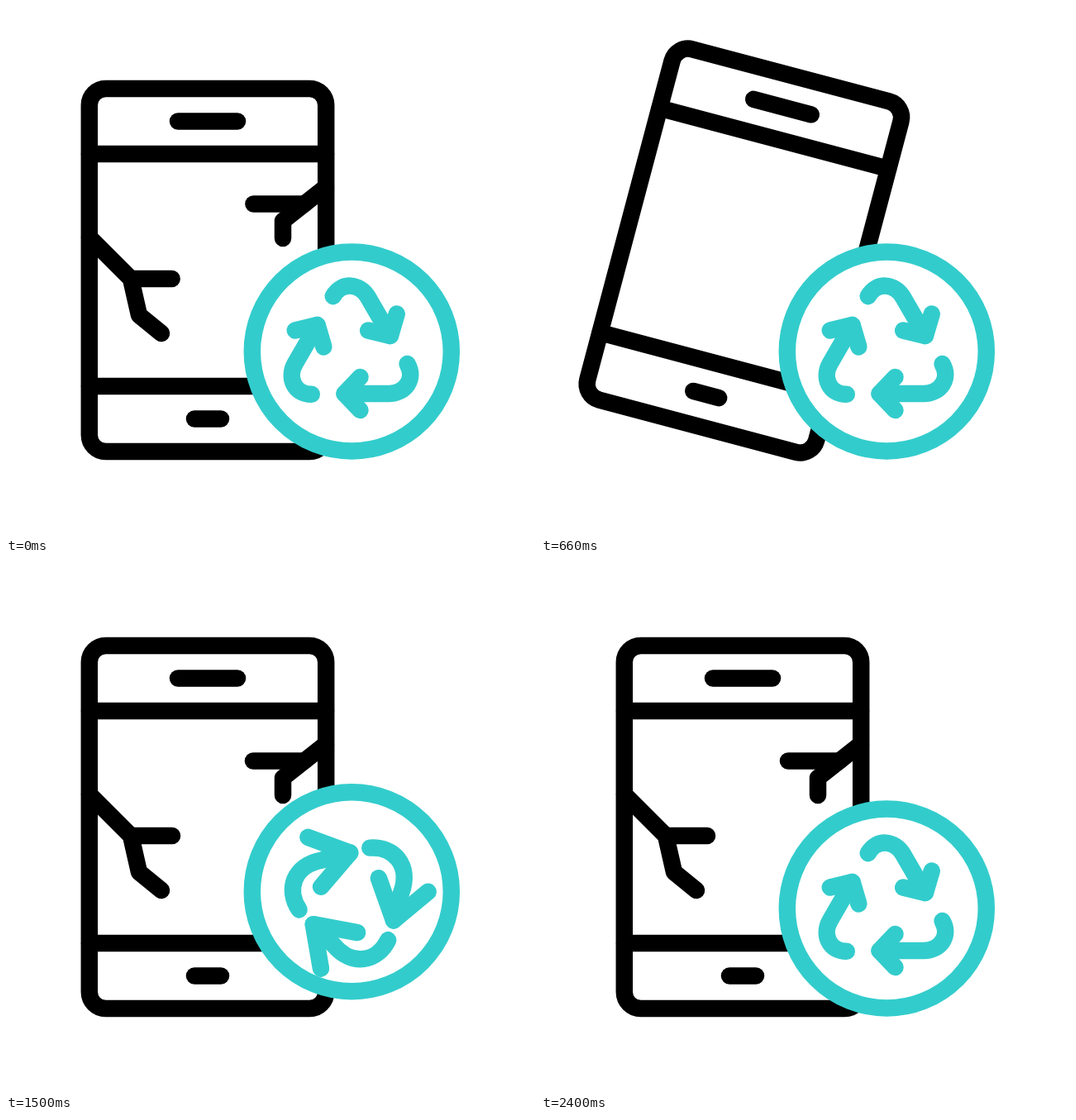
An HTML page with a canvas that plays this animation: 640 by 640 pixels, repeating every 2.8 s.

```html
<!DOCTYPE html>
<html lang="en">
<head>
<meta charset="utf-8">
<title>Phone recycling</title>
<style>
  html, body { margin: 0; height: 100%; overflow: hidden; background: #fff; }
  canvas { display: block; }
</style>
</head>
<body>
<canvas id="stage" width="640" height="640"></canvas>
<script>
const ctx = document.getElementById('stage').getContext('2d');
const LOOP = 2800, TAU = Math.PI * 2;
const TEAL = '#33cccc', BLACK = '#000', LINE = 20.5;
const CENTER = { x: 244, y: 319.7 };

const linear = (t, a, b) => Math.min(1, Math.max(0, (t - a) / (b - a)));
const smooth = (t, a, b) => { const u = linear(t, a, b); return u * u * (3 - 2 * u); };

// Rise that starts at a and is over by b, then the way back from c to d.
const swing = (t, a, b, c, d) => smooth(t, a, b) - smooth(t, c, d);

// The phone crouches, leaps, hovers, lands deep and settles.
const phoneLift = t =>
  27 * smooth(t, 0, 110) - 110 * smooth(t, 110, 240) + 58 * smooth(t, 240, 510)
  + 5 * smooth(t, 510, 920) + 54.5 * smooth(t, 920, 1170) - 34.5 * smooth(t, 1170, 1390);
const phoneTilt = t => 17 * swing(t, 0, 850, 920, 1240) * Math.PI / 180;
const badgeLift = t => -36.5 * swing(t, 1200, 1760, 1920, 2400);
const arrowTurn = t => TAU / 3 * smooth(t, 1200, 1920);
const arrowStretch = t => 1.07 * Math.sin(Math.PI * linear(t, 1200, 1920)) ** 2;

// Trunks and twigs of the cracks; grow is the time span of their return.
const TRUNK_FADE = [60, 380], TWIG_FADE = [0, 150];
const cracks = [
  { points: [[101, 280], [151, 330], [161, 374], [188, 396]], fade: TRUNK_FADE, grow: [797, 1480] },
  { points: [[151, 330], [201, 330]], fade: TWIG_FADE, grow: [1160, 1460] },
  { points: [[387, 219], [335, 260], [335, 281]], fade: TRUNK_FADE, grow: [680, 1220] },
  { points: [[361, 239.5], [299, 239.5]], fade: TWIG_FADE, grow: [1000, 1330] }
];

function strokeLine(...points) {
  ctx.beginPath();
  points.forEach(p => ctx.lineTo(...p));
  ctx.stroke();
}

function strokePart(points, part) {
  if (part <= 0) return;
  const lengths = points.slice(1).map((p, i) => Math.hypot(p[0] - points[i][0], p[1] - points[i][1]));
  let left = part * lengths.reduce((a, b) => a + b);
  const drawn = [points[0]];
  for (let i = 0; i < lengths.length && left > 0; i++) {
    const u = Math.min(1, left / lengths[i]);
    const [x0, y0] = points[i], [x1, y1] = points[i + 1];
    drawn.push([x0 + (x1 - x0) * u, y0 + (y1 - y0) * u]);
    left -= lengths[i];
  }
  strokeLine(...drawn);
}

function drawPhone(t) {
  const tilt = phoneTilt(t);
  const bar = (x, y, width) => strokeLine([x, y], [x + width, y]);
  ctx.save();
  ctx.translate(CENTER.x + 7 * Math.sin(tilt), CENTER.y + phoneLift(t));
  ctx.rotate(tilt);
  ctx.translate(-CENTER.x, -CENTER.y);
  ctx.strokeStyle = BLACK;
  ctx.beginPath();
  ctx.roundRect(100.8, 100, 286.4, 439, 20);
  ctx.stroke();
  bar(101, 179, 286);
  bar(101, 460, 286);
  bar(208, 139.5, 72);
  bar(228, 499.5, 32);
  for (const { points, fade, grow } of cracks) {
    strokePart(points, 1 - linear(t, ...fade) + linear(t, ...grow));
  }
  ctx.restore();
}

// One arrow below the centre; s lengthens its head and shaft.
function drawArrow(s) {
  const tip = [-7.5 - 4 * s, 51 + 4 * s];
  const barb = side => [tip[0] + 19 + 25.5 * s, tip[1] + side * (20 + 11 * s)];
  ctx.beginPath();
  ctx.moveTo(68.5 - 3 * s, 15 - 11 * s);
  ctx.bezierCurveTo(79 - 4 * s, 33 - 2 * s, 66 - 7 * s, 51 + 7 * s, 46 - 23 * s, tip[1]);
  ctx.lineTo(...tip);
  ctx.stroke();
  strokeLine(barb(-1), tip, barb(1));
}

function drawBadge(t) {
  const stretch = arrowStretch(t);
  ctx.save();
  ctx.translate(418.3, 418 + badgeLift(t));
  ctx.strokeStyle = TEAL;
  ctx.beginPath();
  ctx.arc(0, 0, 120.5, 0, TAU);
  ctx.fill();
  ctx.stroke();
  ctx.translate(-1.3 + 2 * stretch, 9 * stretch);
  ctx.rotate(arrowTurn(t));
  for (let i = 0; i < 3; i++) {
    drawArrow(stretch);
    ctx.rotate(TAU / 3);
  }
  ctx.restore();
}

function draw(t) {
  ctx.fillStyle = '#fff';
  ctx.fillRect(0, 0, 640, 640);
  ctx.lineWidth = LINE;
  ctx.lineCap = ctx.lineJoin = 'round';
  drawPhone(t);
  drawBadge(t);
}

const start = performance.now();
function tick() {
  draw((performance.now() - start) % LOOP);
  requestAnimationFrame(tick);
}
tick();
</script>
</body>
</html>
```
